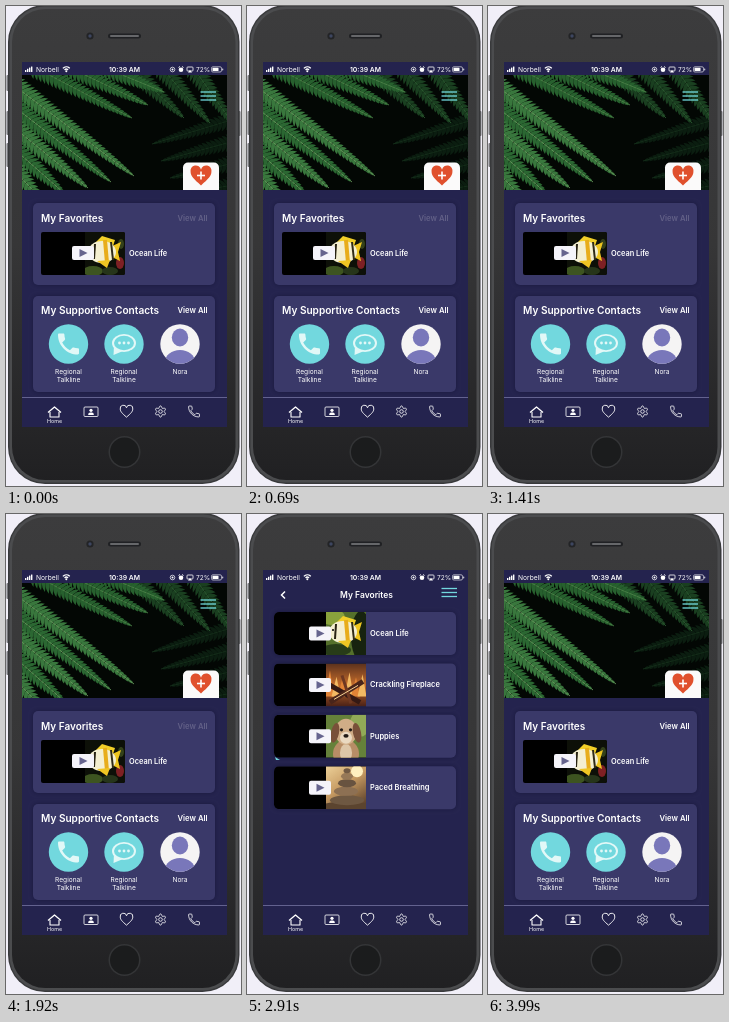
Write an HTML page with a canvas that moves like this. It is 235 px wide and 480 px high and loops after 4.02 s.

```html
<!DOCTYPE html>
<html lang="en">
<head>
<meta charset="utf-8">
<style>
html, body { margin: 0; width: 100%; height: 100%; overflow: hidden; background: #f1eff8; }
canvas { display: block; width: 235px; height: 480px; }
</style>
</head>
<body>
<canvas id="stage"></canvas>
<script>
const LOOP = 4020, OPEN = 2880, BACK = 3690;
const NAVY = '#24234e', CARD = '#3a3969', TEAL = '#72d8de', PALE = '#e2f8f7', WHITE = '#fff', LILAC = '#7977ba';
const canvas = document.getElementById('stage');
const dpr = Math.max(1, window.devicePixelRatio || 1);
canvas.width = 235 * dpr;
canvas.height = 480 * dpr;
const c = canvas.getContext('2d');

const HANDSET = new Path2D('M6.6 10.8c1.4 2.8 3.8 5.1 6.6 6.6l2.2-2.2c.3-.3.7-.4 1-.2 1.1.4 2.3.6 3.6.6.6 0 1 .4 1 1V20c0 .6-.4 1-1 1C10.6 21 3 13.4 3 4c0-.6.4-1 1-1h3.5c.6 0 1 .4 1 1 0 1.2.2 2.4.6 3.6.1.3 0 .7-.3 1z');
const HEART = new Path2D('M12 21C5 15 2 12 2 8a5 5 0 0 1 10-2 5 5 0 0 1 10 2c0 4-3 7-10 13z');

function box(x, y, w, h, r, fill) {
  c.beginPath();
  c.roundRect(x, y, w, h, r);
  if (fill) { c.fillStyle = fill; c.fill(); }
}
function frame(x, y, w, h, r, width) {
  box(x, y, w, h, r);
  c.strokeStyle = WHITE;
  c.lineWidth = width;
  c.stroke();
}
function oval(x, y, rx, ry, fill, turn = 0) {
  c.beginPath();
  c.ellipse(x, y, rx, ry, turn, 0, Math.PI * 2);
  c.fillStyle = fill;
  c.fill();
}
const dot = (x, y, r, fill) => oval(x, y, r, r, fill);
function line(points, color, width, close) {
  c.beginPath();
  points.forEach(([x, y]) => c.lineTo(x, y));
  if (close) c.closePath();
  c.strokeStyle = color;
  c.lineWidth = width;
  c.stroke();
}
function poly(points, fill) {
  c.beginPath();
  points.forEach(([x, y]) => c.lineTo(x, y));
  c.fillStyle = fill;
  c.fill();
}
function ring(x, y, r, color, width, from = 0, to = Math.PI * 2) {
  c.beginPath();
  c.arc(x, y, r, from, to);
  c.strokeStyle = color;
  c.lineWidth = width;
  c.stroke();
}
function fade(x0, y0, x1, y1, ...colors) {
  const g = c.createLinearGradient(x0, y0, x1, y1);
  colors.forEach((color, i) => g.addColorStop(i / (colors.length - 1), color));
  return g;
}
function text(s, x, y, size, weight = 600, align = 'left', color = WHITE) {
  c.font = `${weight} ${size}px Inter, Roboto, sans-serif`;
  c.textAlign = align;
  c.fillStyle = color;
  c.fillText(s, x, y);
}
function icon(path, x, y, size, color, width) {
  const k = size / 24;
  c.save();
  c.translate(x - size / 2, y - size / 2);
  c.scale(k, k);
  c.fillStyle = c.strokeStyle = color;
  c.lineWidth = width / k;
  if (width) c.stroke(path); else c.fill(path);
  c.restore();
}
function clipped(x, y, w, h, r, draw) {
  c.save();
  box(x, y, w, h, r);
  c.clip();
  draw();
  c.restore();
}

function body() {
  c.fillStyle = '#f1eff8';
  c.fillRect(0, 0, 235, 480);
  for (const [x, y, h] of [[0.5, 69, 16], [0.5, 105, 24], [0.5, 137, 24], [231.5, 105, 25]])
    box(x, y, 3, h, 1, '#77787b');
  box(2, -1, 231.5, 479, 37, '#38393b');
  box(3.5, 0.5, 228.5, 476, 35, '#4b4c4e');
  box(6, 3, 223.5, 471, 33, fade(0, 0, 0, 478, '#3c3c3d', '#363637', '#202022'));
  dot(84, 30, 3.6, '#232426');
  dot(84, 30, 1.7, '#3d4660');
  box(102, 27.5, 33, 5, 2.5, '#202124');
  box(104, 29, 29, 2, 1, '#66676a');
  dot(118.5, 446, 16, '#343537');
  dot(118.5, 446, 14.5, '#1b1c1d');
  c.fillStyle = NAVY;
  c.fillRect(16, 56, 205, 365);
}

function statusBar() {
  for (let i = 0; i < 4; i++) box(19 + i * 2, 64 - i * 1.2, 1.4, 2 + i * 1.2, 0.3, WHITE);
  text('Norbell', 30, 66, 6.7, 400);
  for (const r of [2.3, 4.6]) ring(60.3, 65.5, r, WHITE, 1.4, -2.4, -0.74);
  dot(60.3, 65.2, 1, WHITE);
  text('10:39 AM', 118.5, 66, 6.8, 600, 'center');
  ring(166.5, 63.5, 2.3, WHITE, 0.7);
  dot(166.5, 63.5, 1, WHITE);
  dot(175, 63.7, 2.3, WHITE);
  line([[172.5, 61.5], [174, 60.5]], WHITE, 0.9);
  line([[176, 60.5], [177.5, 61.5]], WHITE, 0.9);
  frame(181, 61, 6, 4, 0.8, 0.8);
  poly([[182, 66.5], [184, 64], [186, 66.5]], WHITE);
  text('72%', 190, 66, 6.5, 400);
  frame(205.5, 60.8, 10, 5.2, 1.4, 0.6);
  box(206.5, 61.8, 6, 3.2, 0.6, WHITE);
  box(216.3, 62.4, 0.9, 2, 0.4, WHITE);
}

function menu(y) {
  for (let i = -1; i < 2; i++) line([[194.5, y + i * 4], [210, y + i * 4]], TEAL, 1.3);
}

// A tapering stem with paired pointed leaflets.
function frond(x0, y0, x1, y1, reach, fill, vein) {
  const a = Math.atan2(y1 - y0, x1 - x0), span = Math.hypot(x1 - x0, y1 - y0);
  const n = Math.round(span / 4.4), gap = span / n;
  for (let i = 0; i < n; i++) {
    const t = i / n, len = reach * Math.pow(1 - t, 0.6);
    for (const side of [-1, 1]) {
      c.save();
      c.translate(x0 + (x1 - x0) * t, y0 + (y1 - y0) * t);
      c.rotate(a + side * 1.1);
      c.beginPath();
      c.moveTo(0, -gap * 0.45);
      c.quadraticCurveTo(len * 0.6, -gap * 0.55, len, side * -1.5);
      c.quadraticCurveTo(len * 0.6, gap * 0.55, 0, gap * 0.45);
      c.fillStyle = fill;
      c.fill();
      c.restore();
    }
  }
  line([[x0, y0], [x1, y1]], vein, 0.9);
}

function hero() {
  clipped(16, 69, 205, 115, 0, () => {
    c.fillStyle = '#030704';
    c.fillRect(16, 69, 205, 115);
    for (let i = 0; i < 4; i++)
      frond(232, 112 + i * 22, 146 + i * 9, 138 + i * 17, 11, '#0b1d10', '#16301b');
    for (let i = 0; i < 3; i++)
      frond(122 + i * 32, 60, 178 + i * 26, 112 + i * 5, 13, '#1a3f20', '#2c5a30');
    for (let i = 0; i < 3; i++)
      frond(26 + i * 34, 60, 126 + i * 16, 112 - i * 13, 13, '#27602e', '#4c8348');
    for (let i = 0; i < 5; i++)
      frond(6, 78 + i * 21, 128 - i * 23, 170 + i * 6, 14, i % 2 ? '#2b6732' : '#39773d', '#66975b');
  });
  menu(90);
  box(177, 156.5, 36, 27.5, [5, 5, 0, 0], '#fbfafa');
  icon(HEART, 195, 170, 25, '#e0502d');
  line([[195, 165.5], [195, 173.5]], WHITE, 1.6);
  line([[191, 169.5], [199, 169.5]], WHITE, 1.6);
}

function card(y, h) {
  c.save();
  c.shadowColor = 'rgba(10,10,40,.45)';
  c.shadowBlur = 4 * dpr;
  box(27, y, 182, h, 5, CARD);
  c.restore();
}

function fish() {
  poly([[25, 15], [36, 10], [33, 20], [35, 29], [25, 24]], '#efc51f');
  poly([[6, 15], [17, 4], [30, 8], [26, 20]], '#f2cf28');
  oval(17, 20, 14, 11, '#f4efd0');
  line([[10, 12], [9, 27]], '#282313', 2);
  line([[20, 8], [22, 31]], '#e8ad1b', 4);
  line([[26, 10], [28, 28]], '#302b17', 2);
  poly([[12, 29], [25, 28], [22, 36]], '#efc523');
  dot(7, 18, 1.1, '#111');
}

// Each picture fills a 40 by 43 tile.
const pictures = {
  reef() {
    c.fillStyle = '#0d1008';
    c.fillRect(0, 0, 40, 43);
    oval(8, 39, 10, 5, '#3d5420');
    oval(25, 39, 8, 4, '#26351a');
    oval(35, 31, 4, 6, '#7e2024');
    oval(36, 12, 3, 5, '#33401a');
    fish();
  },
  fish() {
    c.fillStyle = '#55702b';
    c.fillRect(0, 0, 40, 43);
    oval(6, 5, 13, 8, '#89a23c');
    oval(35, 24, 10, 25, '#17230f');
    oval(10, 38, 15, 6, '#283c18');
    fish();
  },
  fire() {
    c.fillStyle = fade(0, 0, 0, 43, '#5b311d', '#c46c2b', '#4b2116');
    c.fillRect(0, 0, 40, 43);
    for (let i = 0; i < 6; i++) {
      const x = 3 + i * 6.5, top = 7 + 7 * Math.abs(Math.sin(i * 2));
      poly([[x - 4, 33], [x + 1, top], [x + 5, 33]], i % 2 ? '#f2b963' : '#e18336');
    }
    line([[1, 20], [34, 39]], '#351914', 5);
    line([[4, 39], [37, 18]], '#4a251a', 5);
    line([[16, 12], [25, 40]], '#6e3822', 3);
    line([[8, 36], [32, 22]], '#f7d293', 1);
  },
  puppy() {
    c.fillStyle = '#65813a';
    c.fillRect(0, 0, 40, 43);
    oval(34, 9, 10, 13, '#91a957');
    oval(20, 39, 13, 14, '#b78d66');
    oval(20, 38, 6, 9, '#ddc6a8');
    oval(20, 17, 11, 13, '#d0ad87');
    oval(9, 18, 4, 10, '#795039', 0.2);
    oval(31, 18, 4, 10, '#795039', -0.2);
    oval(20, 23, 6, 6, '#ead9c1');
    dot(15.5, 15, 1.6, '#211a16');
    dot(24.5, 15, 1.6, '#211a16');
    oval(20, 21, 2.6, 1.9, '#211a16');
  },
  stones() {
    c.fillStyle = fade(0, 0, 30, 43, '#ecd098', '#c69a62', '#60452d');
    c.fillRect(0, 0, 40, 43);
    dot(31, 5, 6, '#fff0bf');
    oval(20, 41, 25, 6, '#5b442f');
    oval(21, 34, 17, 5, '#6e5842');
    oval(20, 25, 12, 4.5, '#8d7053');
    oval(21, 17, 9, 4, '#685340');
    oval(21, 10, 6, 3.5, '#967857');
    oval(21, 4.5, 3.5, 2.5, '#715a44');
  }
};

function thumb(kind, x, y, w, radius) {
  clipped(x, y, w, 43, radius, () => {
    c.fillStyle = '#000';
    c.fillRect(x, y, w, 43);
    c.translate(79, y);
    c.beginPath();
    c.rect(0, 0, 40, 43);
    c.clip();
    pictures[kind]();
  });
}
function play(x, y) {
  box(x, y, 22, 14, 2, '#f5f4fa');
  poly([[x + 7.5, y + 3], [x + 15.5, y + 7], [x + 7.5, y + 11]], '#66648e');
}

function home(pressed) {
  hero();
  card(197, 82);
  text('My Favorites', 35, 215.5, 10);
  text('View All', 201.5, 215, 7.7, 600, 'right', pressed ? '#626087' : WHITE);
  thumb('reef', 35, 226, 84, 2);
  play(66, 240);
  text('Ocean Life', 123, 249.5, 7.4);

  card(290, 96);
  text('My Supportive Contacts', 35, 308, 10.1);
  text('View All', 201.5, 307, 7.7, 600, 'right');
  dot(62.5, 338, 19.7, TEAL);
  icon(HANDSET, 62.5, 338, 28, PALE);
  dot(118, 338, 19.7, TEAL);
  oval(118, 337, 12, 9, PALE);
  poly([[108, 340], [107.5, 349], [117, 345]], PALE);
  oval(118, 337, 10, 7.2, TEAL);
  for (let i = -1; i < 2; i++) dot(118 + i * 4.5, 337, 1.4, PALE);
  dot(174, 338, 19.7, '#f5f4f4');
  clipped(154.3, 318.3, 39.4, 39.4, 19.7, () => {
    oval(174, 331.5, 8.2, 9, LILAC);
    oval(174, 356, 15, 12, LILAC);
  });
  for (const x of [62.5, 118]) {
    text('Regional', x, 368, 6.6, 400, 'center');
    text('Talkline', x, 376, 6.6, 400, 'center');
  }
  text('Nora', 174, 368, 6.6, 400, 'center');
}

function favorites() {
  line([[38, 77.5], [34.5, 81], [38, 84.5]], WHITE, 1.5);
  text('My Favorites', 119.5, 84, 8.5, 600, 'center');
  menu(78.5);
  const rows = [['fish', 'Ocean Life'], ['fire', 'Crackling Fireplace'], ['puppy', 'Puppies'], ['stones', 'Paced Breathing']];
  rows.forEach(([kind, label], i) => {
    const y = 98 + i * 51.4;
    card(y, 43);
    thumb(kind, 27, y, 92, [5, 0, 0, 5]);
    play(62, y + 14.5);
    text(label, 123, y + 24, 7.5);
  });
  poly([[28, 243], [33, 246], [29, 246]], TEAL);
}

function tabs() {
  line([[16, 391.5], [221, 391.5]], '#7473a0', 0.8);
  c.lineJoin = 'round';
  line([[42, 406.5], [48.5, 401], [55, 406.5]], WHITE, 1.3);
  line([[44, 406], [44, 411], [53, 411], [53, 406]], WHITE, 1.1);
  text('Home', 48.5, 417, 5.4, 400, 'center');
  frame(78, 401, 14, 9.5, 1, 0.8);
  dot(85, 404.3, 1.6, WHITE);
  box(82.2, 406.5, 5.6, 2.6, [2, 2, 0, 0], WHITE);
  icon(HEART, 120.5, 405.5, 15, WHITE, 0.9);
  const gear = [];
  for (let i = 0; i < 48; i++) {
    const a = i * Math.PI / 24, r = 4.6 + Math.cos(a * 6);
    gear.push([154.5 + r * Math.sin(a), 405.5 + r * Math.cos(a)]);
  }
  line(gear, WHITE, 0.8, true);
  ring(154.5, 405.5, 1.8, WHITE, 0.8);
  icon(HANDSET, 188, 405.5, 14.5, WHITE, 0.8);
  c.lineJoin = 'miter';
}

function draw(view) {
  c.setTransform(dpr, 0, 0, dpr, 0, 0);
  body();
  statusBar();
  if (view === 'list') favorites();
  else home(view === 'pressed');
  tabs();
}

const start = performance.now();
let shown = '';
function tick() {
  const t = (performance.now() - start) % LOOP;
  const view = t < OPEN ? 'pressed' : t < BACK ? 'list' : 'home';
  if (view !== shown) draw(shown = view);
  requestAnimationFrame(tick);
}
tick();
</script>
</body>
</html>
```
